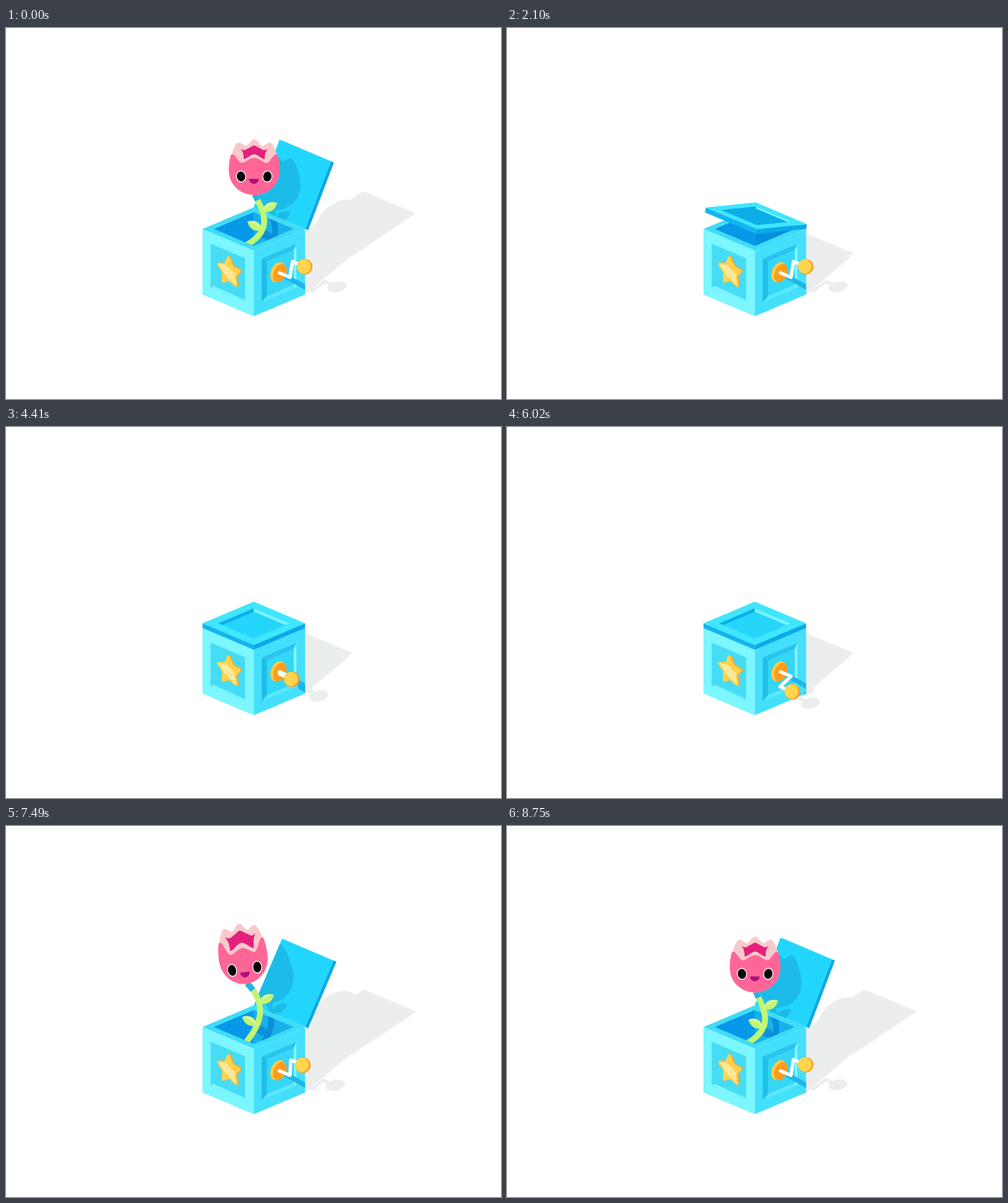
An HTML page with a canvas that plays this animation: 800x600 px, repeating every 8820 ms.

```html
<!DOCTYPE html>
<html>
<head>
<meta charset="utf-8">
<style>
html, body { margin: 0; width: 100%; height: 100%; overflow: hidden; background: #fff; }
canvas { display: block; }
</style>
</head>
<body>
<canvas id="c" width="800" height="600"></canvas>
<script>
const g = document.getElementById('c').getContext('2d');
const LOOP = 8820, STEP = 70, TAU = 2 * Math.PI;
const S = 117, HALF = S / 2, THICK = 8.3, SHADOW = '#eceeee';
const POP = 6760;

const clamp = (x, a, b) => Math.max(a, Math.min(b, x));
const span = (t, a, b) => clamp((t - a) / (b - a), 0, 1);
const smooth = (t, a, b) => { const x = span(t, a, b); return x * x * (3 - 2 * x); };
const easeOut = (t, a, b) => 1 - (1 - span(t, a, b)) ** 2;
const arc = (t, a, b) => Math.sin(Math.PI * span(t, a, b));
const damp = (x, decay) => x < 0 ? 0 : Math.exp(-x / decay);
const spring = (x, decay, period) => damp(x, decay) * Math.cos(TAU * x / period);

function pose(t) {
  const stretchUp = arc(t, 6790, 7070) ** 2, whip = arc(t, 6790, 7350);
  const closing = t - 2140, swing = (t - 7350 + LOOP) % LOOP;
  const sway = damp(swing, 300) * Math.sin(TAU * swing / 560) / .627;
  const p = { whip, roll: stretchUp };

  const shut = 120 * (1 - span(t, 1480, 2140) ** 2);
  const bounce = 5 * damp(closing, 150) * Math.abs(Math.sin(TAU * closing / 420)) * (t < 2520);
  p.lid = t < 6790 ? shut + bounce : 120 * (1 - spring(t - 6790, 200, 1270));

  p.crank = 12 + 360 * easeOut(t, 3640, 5060) + 240 * smooth(t, 5180, 6090) + 120 * easeOut(t, 6160, 7980);
  p.lift = 60 * 4 * span(t, 6880, 7280) * (1 - span(t, 6880, 7280));
  p.tall = 1 - .2 * smooth(t, 6160, 6600) * (1 - smooth(t, 6740, 6860))
    + .265 * stretchUp - .15 * arc(t, 7280, 7480) ** 2;

  const dive = 14 * arc(t, 560, 1120) - 46 * smooth(t, 1000, 1330) + 230 * smooth(t, 1400, 1820);
  p.headY = t < POP ? dive : 180 * spring(t - POP, 400, 768) - 46 * sway;
  p.headX = -28 * whip - 18 * sway;
  p.turn = -.18 * whip - .13 * sway;
  p.tip = t < POP ? 0 : 1 - smooth(t, 7420, 7840);
  p.stretch = clamp(1 - .005 * p.headY, .86, 1.13);
  p.shown = p.headY < 172;
  return p;
}

let m;  // pose for the current moment

const girth = q => {
  const squash = Math.max(0, 1 - m.tall), pull = Math.max(0, m.tall - 1);
  return 1 + squash * (.45 + 2 * q * (1 - q)) - pull * .7 * (1 - (1 - q) ** 4);
};

// Box space, bent and lifted, centred on the box axis.
function warp(x, y, z) {
  const k = girth(clamp(z / S, 0, 1));
  return [(x - HALF) * k, (y - HALF) * k, z * m.tall + m.lift / .905];
}
function lidPoint(s, y, n) {
  const a = m.lid * Math.PI / 180, sin = Math.sin(a), cos = Math.cos(a);
  return [HALF * girth(1) - s * cos + n * sin, y - HALF, S * m.tall + m.lift / .905 + s * sin + n * cos];
}
function screen([x, y, z]) {
  const px = (x - y) * .709, py = -(x + y) * .3 - z * .905, r = m.roll * .033;
  return [400.5 - 6 * m.roll + px - r * py, 431 + py + r * px];
}
function ground([x, y, z]) {
  const h = z * .905;
  return [400.5 - 6 * m.roll + (x - y) * .709 + .68 * h, 431 - (x + y) * .3 - .575 * h];
}

function trace(pts) {
  g.beginPath();
  pts.forEach(p => g.lineTo(...p));
}
function fill(pts, color) {
  trace(pts);
  g.closePath();
  g.fillStyle = color;
  g.fill();
}
function line(pts, width, color) {
  trace(pts);
  g.lineWidth = width;
  g.strokeStyle = color;
  g.stroke();
}
function oval(x, y, rx, ry, color, turn = 0, end = TAU) {
  g.beginPath();
  g.ellipse(x, y, rx, ry, turn, 0, end);
  g.fillStyle = color;
  g.fill();
}
function within(pts, draw) {
  g.save();
  trace(pts);
  g.clip();
  draw();
  g.restore();
}

// Polygon on a face, with edges split so that they can bend.
function outline(face, uv) {
  const pts = [];
  uv.forEach(([u, v], i) => {
    const [a, b] = uv[(i + 1) % uv.length];
    for (let j = 0; j < 6; j++) pts.push(screen(face(u + (a - u) * j / 6, v + (b - v) * j / 6)));
  });
  return pts;
}
const box = (a, b, c, d) => [[a, b], [c, b], [c, d], [a, d]];
const square = box(0, 0, S, S);
const patch = (face, uv, color) => fill(outline(face, uv), color);

const left = (u, z) => warp(0, S - u, z);
const right = (u, z) => warp(u, 0, z);
const top_ = (x, y) => warp(x, y, S);

// One strip per side between an outer and an inner rectangle.
function bevel(face, outer, inner, colors) {
  colors.forEach((color, i) => {
    const j = (i + 1) % 4;
    patch(face, [outer[i], outer[j], inner[j], inner[i]], color);
  });
}

function crankPoints() {
  const a = m.crank * Math.PI / 180, x = HALF + 27 * Math.sin(a), z = 58 + 27 * Math.cos(a);
  return [warp(HALF, 0, 58), warp(HALF, -24, 58), warp(x, -24, z), warp(x, -52, z)];
}

function groundShadow(head) {
  const ring = z => square.map(([x, y]) => ground(warp(x, y, z)));
  const low = ring(0), high = ring(S);
  fill(low, SHADOW);
  fill(high, SHADOW);
  low.forEach((p, i) => {
    const j = (i + 1) % 4;
    fill([p, low[j], high[j], high[i]], SHADOW);
  });
  for (const n of [0, THICK]) fill(square.map(([s, y]) => ground(lidPoint(s, y, n))), SHADOW);
  if (m.headY < 80) {
    const h = 431 - head.y;
    oval(head.x + .68 * h, 431 - .575 * h, 44, 31, SHADOW, -.7);
  }
  const pts = crankPoints().map(ground);
  line(pts, 5, SHADOW);
  oval(...pts[3], 15.5, 8.5, SHADOW, -.2);
}

function lid() {
  const size = [S, S, THICK];
  const colors = [['#0baeea', '#14b4f0'], ['#0aa9e8', '#12b0ec'], ['#22d6fb', '#3fe6fc']];
  for (let axis = 0; axis < 3; axis++) for (let end = 0; end < 2; end++) {
    const a = (axis + 1) % 3, b = (axis + 2) % 3;
    const pts = box(0, 0, size[a], size[b]).map(([u, v]) => {
      const p = [];
      p[axis] = end * size[axis];
      p[a] = u;
      p[b] = v;
      return screen(lidPoint(...p));
    });
    if (!end) pts.reverse();
    const [p, q, r] = pts;
    if ((q[0] - p[0]) * (r[1] - q[1]) - (q[1] - p[1]) * (r[0] - q[0]) <= 0) continue;
    fill(pts, colors[axis][end]);
    if (axis == 2 && end) lidPanel();
  }
}
function lidPanel() {
  const face = (s, y) => lidPoint(s, y, THICK), outer = box(18, 18, 99, 99);
  patch(face, outer, '#25d5fa');
  g.globalAlpha = Math.min(1, m.lid / 14);
  patch(face, outer, '#0baee9');
  g.globalAlpha = 1;
  patch(face, [[18, 99], [99, 99], [99, 90], [27, 90]], '#0baeea');
  patch(face, [[18, 18], [18, 99], [27, 90], [27, 18]], '#7cf2ff');
}

function drawStar() {
  const shape = (dx, dy, color) => {
    const pts = [];
    for (let i = 0; i < 10; i++) {
      const r = i % 2 ? 13 : 24.5, a = i * Math.PI / 5 - .07;
      const [x, y] = screen(left(HALF + r * Math.sin(a), 58 + r * Math.cos(a)));
      pts.push([x + dx, y + dy]);
    }
    fill(pts, color);
    g.lineWidth = 5;
    g.strokeStyle = color;
    g.stroke();
    return pts;
  };
  shape(3.5, -2, '#ffa52b');
  within(shape(1.5, -1.5, '#ffd24a'), () =>
    line([screen(left(20, 78)), screen(left(88, 44))], 12, '#ffe89c'));
}

function body() {
  patch(left, square, '#7cf6ff');
  patch(left, box(18.5, 19, 97, 97), '#46dcf5');
  patch(left, [[18.5, 19], [26, 24], [97, 22], [97, 19]], '#7cf6ff');
  drawStar();

  patch(right, square, '#44e0fb');
  bevel(right, box(18, 19, 97, 97), box(30, 26, 91, 88), ['#5ce9fd', '#86f5ff', '#2bc4ee', '#1fbdea']);
  patch(right, box(30, 26, 91, 88), '#36d6f6');
  crank();
}

function crank() {
  const arm = crankPoints(), wall = -HALF * girth(.5);
  const cast = arm.map(([x, y, z]) => {
    const d = (wall - y) / .434;
    return screen([x + 1.3 * d, wall, z - d]);
  });
  within(outline(right, square), () => line(cast, 8, '#1fb6ea'));

  const disc = (y, r, color) => {
    const pts = [];
    for (let a = 0; a < TAU; a += .2) pts.push(screen(warp(HALF + r * Math.cos(a), y, 58 + r * Math.sin(a))));
    fill(pts, color);
  };
  disc(4, 17, '#ffcb3f');
  disc(-1, 15.5, '#ff9c1f');
  const pts = arm.map(screen), [x, y] = pts[3];
  line(pts, 5.5, '#fff');
  oval(x, y, 12.5, 12.5, '#ff9f25');
  oval(x - 1.5, y - .5, 11, 11.5, '#ffd54d');
}

// Corners of the hole: back, right, front, left.
const opening = () => box(104, 104, 13, 13).map(([x, y]) => screen(top_(x, y))).map((p, i, c) => c[[0, 3, 2, 1][i]]);

function rim() {
  patch(top_, square, '#3fdcf8');
  const [back, r, front, l] = opening();
  fill([back, front, l], '#0798ea');
  fill([back, r, front], m.lid > 60 ? '#18b0ea' : '#058fdd');
}

function headPose() {
  const [x, y] = screen(top_(HALF, HALF)), dx = x - 400.5, dy = y - 325;
  return { x: 401 + m.headX + dx, y: 228 + m.headY + dy, base: [385 + dx, 353 + dy + 12 * m.whip] };
}

function stemCurve({ x, y, base: [bx, by] }) {
  const s = 42 * m.stretch, ex = x + 1 - s * Math.sin(m.turn), ey = y + s - 1, h = by - ey;
  const c = [[bx, by], [bx + 47 + 1.2 * m.headX, by - .3 * h], [bx + 33 - .4 * m.headX, by - .63 * h], [ex, ey]];
  return t => [0, 1].map(i => {
    const u = 1 - t;
    return u * u * u * c[0][i] + 3 * u * u * t * c[1][i] + 3 * u * t * t * c[2][i] + t * t * t * c[3][i];
  });
}

const leafPath = new Path2D('M0 0C4 -13 12 -17 24 -13C20 0 10 4 0 0Z');
const leafShine = new Path2D('M0 0C4 -13 12 -17 24 -13C14 -11 6 -6 0 0Z');
function leaf([x, y], side, color, shine) {
  g.save();
  g.translate(x, y);
  g.scale(side, 1);
  g.rotate(.6 * m.whip);
  g.fillStyle = color;
  g.fill(leafPath);
  g.fillStyle = shine;
  g.fill(leafShine);
  g.restore();
}
function stem(head, color, shine = color, end = color) {
  const at = stemCurve(head), pts = [];
  for (let i = 0; i <= 20; i++) pts.push(at(i / 20));
  line(pts, 9.5, color);
  g.lineCap = 'butt';
  line(pts.slice(18), 9.5, end);
  g.lineCap = 'round';
  leaf(at(.7), 1, color, shine);
  leaf(at(.34), -1, color, shine);
}

// Half shapes, mirrored when painted.
const bulb = new Path2D('M1 -48C-6 -48 -9 -37 -14 -37C-22 -42 -26 -46 -30 -39C-36 -29 -41 -12 -41 2C-41 25 -23 42 1 42Z');
const heart = new Path2D('M1 -38C-4 -38 -6 -34 -11 -33C-13 -31 -16 -29 -22 -33C-18 -28 -17 -24 -17 -16C-10 -17 -6 -24 1 -24Z');
function mirrored(path, color) {
  g.fillStyle = color;
  for (let i = 0; i < 2; i++) {
    g.fill(path);
    g.scale(-1, 1);
  }
}

function inHead(x, y, draw) {
  g.save();
  g.translate(x, y);
  g.rotate(m.turn);
  g.scale(1 - Math.abs(m.stretch - 1) * .4, m.stretch);
  draw();
  g.restore();
}
function drawHead() {
  const k = m.tip, dip = -10 + 7 * k, peak = dip - 8, eyeY = 12 + 8 * k;
  mirrored(bulb, '#f9c8cb');
  mirrored(new Path2D(`M1 42C-23 42 -41 25 -41 2C-41 -7 -40 -14 -38 -22
    C-31 -29 -27 ${dip} -20 ${dip}C-14 ${dip} -8 ${peak} 1 ${peak}Z`), '#ff6698');
  g.save();
  g.translate(0, -27 + 4 * k);
  g.scale(1 + .2 * k, 1 + .3 * k);
  g.translate(0, 27);
  mirrored(heart, '#e4207d');
  g.restore();
  for (const side of [-1, 1]) {
    oval(side * 21.3, eyeY, 8.2, 9.6, '#fff', side * .15);
    oval(side * 21.3, eyeY, 6.8, 8.2, '#050505', side * .15);
  }
  oval(-.5, eyeY + 4 + k, 8, 8, '#b0107f', 0, Math.PI);
}

function castFlower(head) {
  const a = m.lid * Math.PI / 180, cot = -Math.cos(a) / Math.sin(a);
  const [, hinge] = screen(top_(HALF, HALF));
  const drop = Math.max(0, (HALF + (hinge - head.y) / .905 * cot - (head.x - 401) / 1.4) / (1.3 + cot)) * .905;
  within(square.map(([s, y]) => screen(lidPoint(s, y, 0))), () => {
    inHead(head.x + drop * .58, head.y + drop * .43, () => mirrored(bulb, '#1cbbe8'));
    g.translate(21, 15);
    stem(head, '#1cbbe8');
  });
}

function flower(head, open) {
  const [back, r, front, l] = opening();
  if (open) within([back, r, front], () => {
    g.translate(18, 15);
    stem(head, '#0a8fda');
  });
  within([l, front, r, [r[0] + 250, -300], [l[0] - 250, -300]], () => {
    stem(head, '#c3f572', '#d9f992', '#22b4e4');
    inHead(head.x, head.y, drawHead);
  });
}

function draw(t) {
  m = pose(t);
  g.fillStyle = '#fff';
  g.fillRect(0, 0, 800, 600);
  g.lineCap = g.lineJoin = 'round';
  const head = headPose(), open = m.lid > 60;
  groundShadow(head);
  if (open) {
    lid();
    if (m.shown) castFlower(head);
  }
  rim();
  body();
  if (m.shown) flower(head, open);
  if (!open) lid();
}

const start = performance.now();
function tick() {
  const t = (performance.now() - start) % LOOP;
  draw(Math.floor(t / STEP) * STEP);
  requestAnimationFrame(tick);
}
tick();
</script>
</body>
</html>
```
